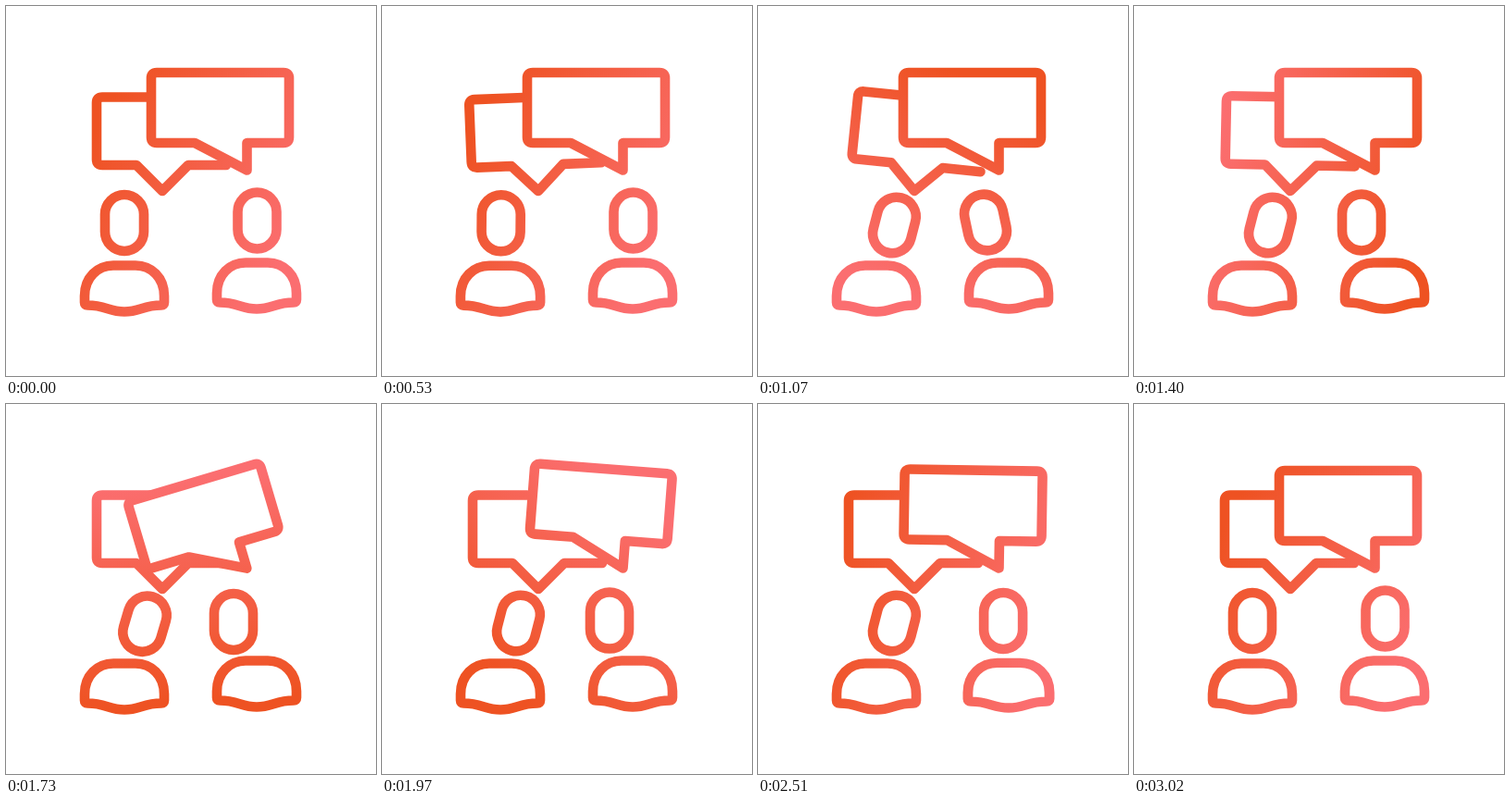
Write an HTML page with a canvas that moves like this. It is 400x400 px and loops after 3.05 s.

```html
<!DOCTYPE html>
<html lang="en">
<head>
<meta charset="utf-8">
<title>Conversation</title>
<style>
  html, body { margin: 0; height: 100%; overflow: hidden; background: #fff; }
  canvas { display: block; }
</style>
</head>
<body>
<canvas id="stage" width="400" height="400"></canvas>
<script>
const LOOP = 3050, START = 530, STEP = 30;
const ctx = document.getElementById('stage').getContext('2d');

const frontBubble = new Path2D('M163 72H300q6 0 6 6V142q0 6-6 6H260.5V177.5L204 148H163q-6 0-6-6V78q0-6 6-6Z');
const rearBubble = new Path2D('M157 98.5H104q-6 0-6 6V166q0 6 6 6H141L169 200L197 172H238');
const head = new Path2D('M-21-9.5a21 21 0 0 1 42 0V9.5a21 21 0 0 1-42 0Z');
// The body's origin is the middle of its lower edge.
const body = new Path2D('M-40-7q-3 0-3-3V-17C-43-37-29-50-12-50H12C29-50 43-37 43-17V-10q0 3-3 3C20-7 17 0 0 0C-17 0-20-7-40-7Z');

const rad = deg => deg * Math.PI / 180;
const progress = (t, from, to) => Math.min(1, Math.max(0, (t - from) / (to - from)));
const smooth = u => (1 - Math.cos(Math.PI * u)) / 2;
const ramp = (t, from, to) => smooth(progress(t, from, to));
const bump = (t, from, to) => smooth(2 * progress(t, from, to));

// Damped swing in degrees, slightly quickening as it dies out.
function swing(t, start) {
  const s = Math.max(0, t - start);
  return -23 * Math.max(0, 1 - s / 1200) * Math.sin(2 * Math.PI * (s / 596) ** 1.083);
}

function turn(deg, x, y) {
  ctx.translate(x, y);
  ctx.rotate(rad(deg));
  ctx.translate(-x, -y);
}

function place(path, setup, opaque) {
  ctx.save();
  setup();
  if (opaque) {
    ctx.globalCompositeOperation = 'destination-out';
    ctx.fill(path);
    ctx.globalCompositeOperation = 'source-over';
  }
  ctx.stroke(path);
  ctx.restore();
}

function drawBody(x, y, squash) {
  place(body, () => {
    ctx.translate(x, y + squash);
    ctx.scale(1 + 0.025 * squash, 1 - 0.027 * squash);
  });
}

function drawLeftPerson(t, nod) {
  const lean = ramp(t, 480, 900) - ramp(t, 2510, 2860);
  const squash = bump(t, 490, 890) + bump(t, 2510, 2860);
  drawBody(128, 330.5, squash);
  place(head, () => {
    turn(14.5 * lean + 2 * nod, 128, 312);
    ctx.translate(128, 234.5 + 2 * squash);
  });
}

function drawRightPerson(t, nod) {
  const shift = ramp(t, 540, 920) - ramp(t, 2310, 2610);
  const tilt = ramp(t, 540, 920) - ramp(t, 1060, 1400);
  const squash = bump(t, 540, 920) + bump(t, 2310, 2700);
  drawBody(271, 327.5, squash);
  place(head, () => {
    ctx.translate(271.5 - 25.5 * shift, 232 + 2 * shift + 2 * squash + 1.5 * nod);
    ctx.rotate(rad(-12 * tilt));
  });
}

function paint(angle) {
  const dx = 122 * Math.cos(rad(angle)), dy = 122 * Math.sin(rad(angle));
  const fill = ctx.createLinearGradient(200 - dx, 200 - dy, 200 + dx, 200 + dy);
  fill.addColorStop(0, '#ee5222');
  fill.addColorStop(1, '#fb6e70');
  ctx.globalCompositeOperation = 'source-in';
  ctx.fillStyle = fill;
  ctx.fillRect(0, 0, 400, 400);
  ctx.globalCompositeOperation = 'source-over';
}

function draw(t) {
  ctx.clearRect(0, 0, 400, 400);
  ctx.lineWidth = 10.6;
  ctx.lineCap = ctx.lineJoin = 'round';

  place(rearBubble, () => turn(swing(t, 517), 169, 200));
  place(frontBubble, () => turn(swing(t, 1631), 261, 178), true);

  const nod = bump(t, 1420, 2000);
  drawLeftPerson(t, nod);
  drawRightPerson(t, nod);

  paint(28 + 360 * smooth(progress(t, 580, 2900) ** 0.72));
}

const origin = performance.now();
function tick() {
  const t = (performance.now() - origin) % LOOP;
  draw(t < START ? 0 : t - (t - START) % STEP);
  requestAnimationFrame(tick);
}
tick();
</script>
</body>
</html>
```
